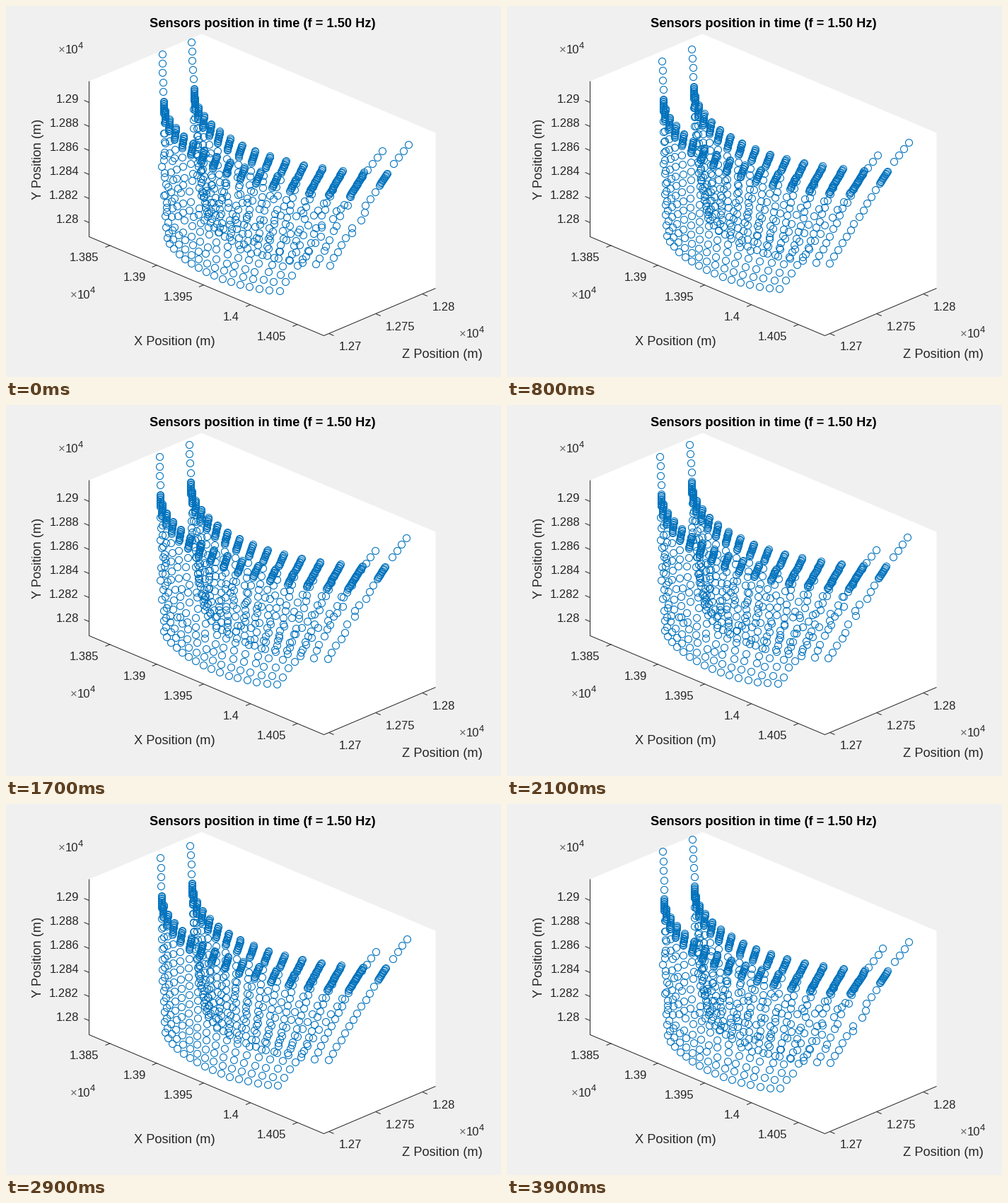
These frames come from a looping animation (700 by 525 pixels, 4000 ms). A matplotlib script:

```python
import numpy as np
import matplotlib.pyplot as plt
from matplotlib.animation import FuncAnimation

W, H, DPI = 700, 525, 100
PX = 72 / DPI
FRAMES, INTERVAL = 40, 100
INK = (0.15, 0.15, 0.15)
BLUE = (0, 114 / 255, 189 / 255)
COLS, CHAIN, LOOSE = 16, 12, 12
rng = np.random.default_rng(4)

plt.rcParams["font.family"] = "Liberation Sans"
fig = plt.figure(figsize=(W / DPI, H / DPI), dpi=DPI, facecolor="#f0f0f0")
ax = fig.add_axes([0, 0, 1, 1])
ax.set_xlim(-0.5, W - 0.5)
ax.set_ylim(H - 0.5, -0.5)
ax.axis("off")


def label(x, y, text, size=16.6, ha="center", **kw):
    kw.setdefault("color", INK)
    ax.text(x, y, text, fontsize=size * PX, ha=ha, va="center", **kw)


def line(*pts):
    xs, ys = zip(*pts)
    ax.plot(xs, ys, color=INK, lw=PX, solid_capstyle="butt")


def ticks(first, step, mark, gap, ha, values):
    """Tick marks along one axis, each with its value beside it."""
    for k, value in enumerate(values):
        x, y = np.add(first, np.multiply(step, k))
        line((x, y), (x + mark[0], y + mark[1]))
        label(x + gap[0], y + gap[1], f"{value:g}", ha=ha)


def exponent(x, y):
    label(x, y, "×", ha="left", color="0.4")
    label(x + 10, y, "10", ha="left")
    label(x + 28.5, y - 6, "4", 13, ha="left")


def draw_axes():
    ax.fill([117, 276, 607, 607, 449, 117], [106, 39, 179, 399, 466, 326],
            color="white", lw=0)
    line((117, 106), (117, 326), (449, 466), (607, 399))
    ticks((117, 306), (0, -34), (-7, -3), (-14.5, -4), "right",
          1.28 + 0.002 * np.arange(6))
    ticks((147, 338), (66.2, 28), (-7, 3), (-16, 18), "right",
          1.385 + 0.005 * np.arange(5))
    ticks((456, 463), (66.2, -28), (7, 3), (14, 19), "left",
          1.27 + 0.005 * np.arange(3))
    for x, y in [(73, 62), (90, 409), (640, 464)]:
        exponent(x, y)
    label(362.5, 25.5, "Sensors position in time (f = 1.50 Hz)", 18.25,
          weight="bold", color="black")
    label(237.5, 475, "X Position (m)", 18.3)
    label(616, 493, "Z Position (m)", 18.3)
    label(45, 216.5, "Y Position (m)", 18.3, rotation=90)


def arc(start, end, px, py):
    """One point per column on a hanging curve that falls fast, then runs flat."""
    u = np.linspace(0, 1, COLS)
    (x0, y0), (x1, y1) = start, end
    return np.column_stack([x0 + (x1 - x0) * u ** px,
                            y0 + (y1 - y0) * (1 - (1 - u) ** py)])


def sheet(top, rim, bow):
    """Dense chain below each top point, then a loose string down to the rim.

    Rows are x, y and how freely the point sways."""
    rows = []
    for i, (head, foot) in enumerate(zip(top, rim)):
        u = i / (COLS - 1)
        end = head + (-11 * u, 17)
        for s in np.linspace(0, 1, CHAIN):
            rows.append((*(head + s * (end - head)), 0))
        for s in np.arange(1, LOOSE + 1) / LOOSE:
            x, y = end + s * (foot - end)
            slack = np.sin(np.pi * s)
            rows.append((x - bow * (1 - u) * slack, y, slack))
    return rows


def strand(start, step, count):
    return [(*np.add(start, np.multiply(step, k)), 0) for k in range(1, count + 1)]


front = sheet(arc((222, 134), (496, 251), 1.7, 1.75),
              arc((227, 327), (386, 402), 1.38, 1.65), 1)
back = sheet(arc((265, 116), (538, 236), 1.82, 1.75),
             arc((283, 290), (457, 366), 1.75, 1.55), 4)
ropes = [strand((222, 134), (-0.4, -13.4), 5),
         strand((265, 116), (-0.7, -13.2), 5),
         strand((497, 249), (6.8, -9), 5)]
steady = front + back + strand((541, 232), (6.75, -9.25), 4)
for rope in ropes:
    steady += rope[:-1]
# Rope ends come into view only near the lowest part of the swing
crest = [rope[-1] for rope in ropes]

points = np.array(steady + crest)
sway = rng.normal(0, 2.2, (len(points), 2)) * points[:, 2:]

draw_axes()
dots, = ax.plot([], [], "o", ms=10 * PX, mfc="none", mec=BLUE, mew=1.1 * PX)


def update(n):
    swing = np.cos(2 * np.pi * n / FRAMES)
    count = len(points) if swing > 0.75 else len(steady)
    x, y = (points[:count, :2] + sway[:count] * swing).T
    reach = 2.3 - 1.1 * (x - 220) / 345
    dots.set_data(x + reach * (swing - 1), y + 4.1 * (swing - 1))
    return dots,


anim = FuncAnimation(fig, update, frames=FRAMES, interval=INTERVAL,
                     repeat=True, repeat_delay=0, blit=False)
plt.show()
```
